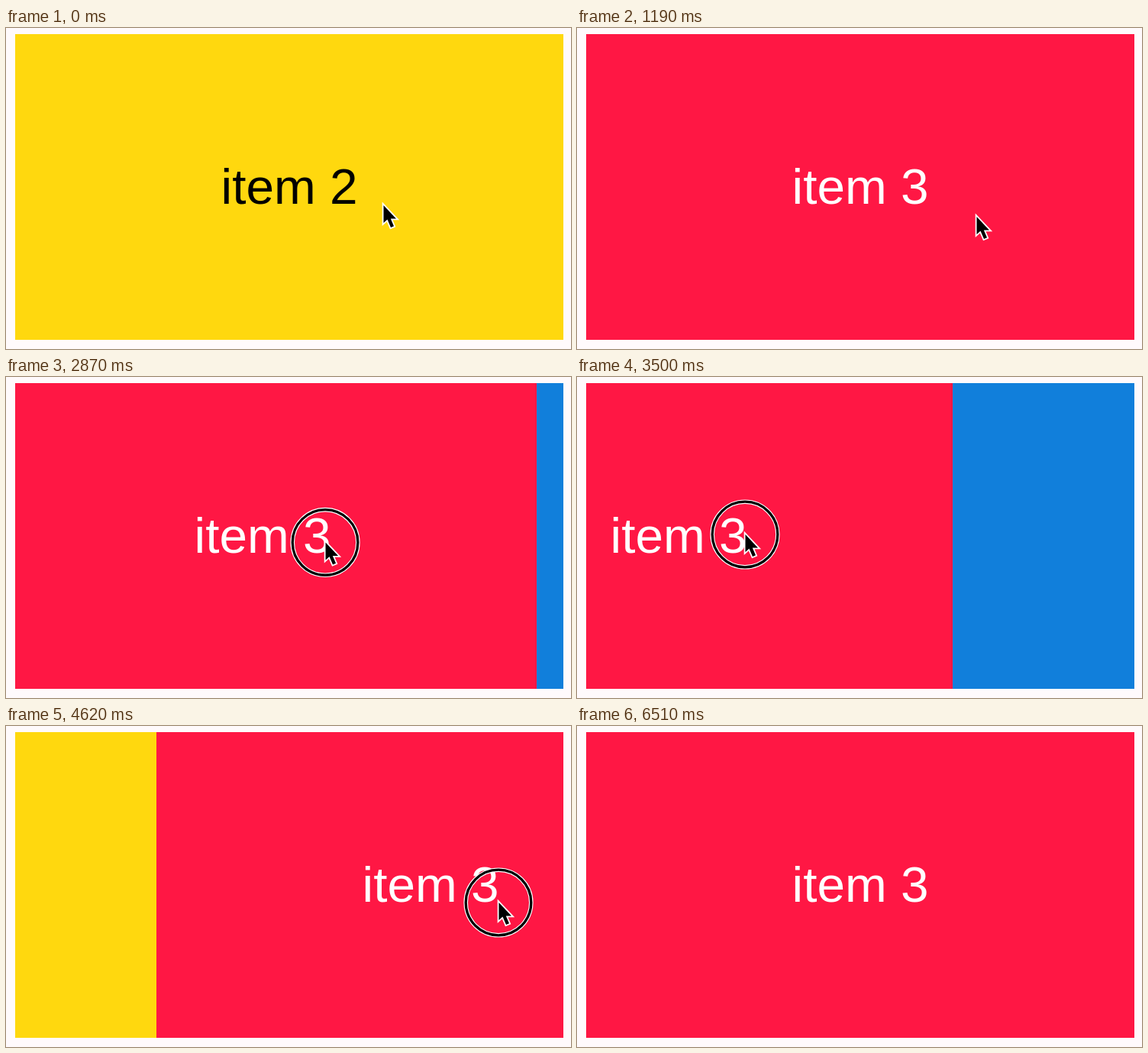
An HTML page that plays this animation: 740x420 px, repeating every 6.58 s.

```html
<!DOCTYPE html>
<html lang="en">
<head>
<meta charset="utf-8">
<title>Carousel</title>
<style>
  html, body { margin: 0; width: 100%; height: 100%; overflow: hidden; background: #fffafc; }
  svg { display: block; }
  text { font: 65.7px "Liberation Sans", Arial, sans-serif; text-anchor: middle; }
</style>
</head>
<body>
<svg width="740" height="420" viewBox="0 0 740 420">
  <clipPath id="frame"><rect x="12" y="8" width="718" height="400"/></clipPath>
  <g clip-path="url(#frame)"><g id="track"></g></g>
  <g id="pointer">
    <g id="ring" fill="none">
      <circle r="42.8" stroke="#fff" stroke-width="5.6"/>
      <circle r="42.8" stroke="#000" stroke-width="3.3"/>
    </g>
    <path id="arrow" d="M.5 0V23L5.5 18.5 10 29 14 27.3 9.8 17.5H17Z"
      stroke="#fff" stroke-width="3.6" paint-order="stroke"/>
    <g id="dot">
      <circle r="19" fill="#000" fill-opacity=".5"/>
      <circle r="21" fill="none" stroke="#fff" stroke-opacity=".35" stroke-width="4"/>
    </g>
  </g>
</svg>
<script>
const LOOP = 6580, STEP = 70, WIDTH = 718;
const SLIDE_AT = 219, RING_AT = 1750, DRAG_AT = 2690, RELEASE_AT = 4874;
const SNAP = 500, LAG = 23, GRAB_X = 460;

const slides = [
  ["item 2", "#ffd80e", "#000"],
  ["item 3", "#ff1744", "#fff"],
  ["item 4", "#117fdb", "#fff"]
];

// time, x, y of the pointer
const path = [
  [0, 494, 232], [140, 493.5, 231], [700, 493.5, 231], [1190, 523, 247],
  [1300, 523, 247], [1820, 310, 226], [1990, 310, 226], [2640, 461, 217],
  [2690, 460, 217], [3360, 256, 210], [3500, 220, 206], [4130, 582, 226],
  [4341, 645, 231], [5130, 645, 231], [5460, 725, 370], [5670, 765, 460]
];

const $ = id => document.getElementById(id);
const show = (id, on) => $(id).setAttribute("visibility", on ? "visible" : "hidden");
const move = (id, x, y) => $(id).setAttribute("transform", `translate(${x} ${y})`);

$("track").innerHTML = slides.map(([label, fill, ink], i) =>
  `<g transform="translate(${12 + i * WIDTH} 8)">
    <rect width="${WIDTH + 0.5}" height="400" fill="${fill}"/>
    <text x="359" y="222" fill="${ink}">${label}</text>
  </g>`).join("");

const slope = (i, axis) =>
  (path[i + 1][axis] - path[i][axis]) / (path[i + 1][0] - path[i][0]);

// Tangents are flat at turning points and at rests.
function tangent(i, axis) {
  if (i === 0 || i === path.length - 1) return 0;
  const a = slope(i - 1, axis), b = slope(i, axis);
  return a * b <= 0 ? 0 : (a + b) / 2;
}

function pointerAt(t, axis) {
  const last = path.length - 1;
  if (t >= path[last][0]) return path[last][axis];
  const i = path.findIndex(p => p[0] > t) - 1;
  const span = path[i + 1][0] - path[i][0];
  const u = (t - path[i][0]) / span, v = 1 - u;
  return path[i][axis] * v * v * (1 + 2 * u) + path[i + 1][axis] * u * u * (3 - 2 * u)
    + span * u * v * (tangent(i, axis) * v - tangent(i + 1, axis) * u);
}

// cubic-bezier(.25, .1, .25, 1)
function ease(x) {
  if (x <= 0) return 0;
  if (x >= 1) return 1;
  const bezier = (s, a, b) => 3 * s * (1 - s) ** 2 * a + 3 * s * s * (1 - s) * b + s ** 3;
  let lo = 0, hi = 1;
  for (let n = 0; n < 24; n++) {
    const mid = (lo + hi) / 2;
    if (bezier(mid, 0.25, 0.25) < x) lo = mid; else hi = mid;
  }
  return bezier(lo, 0.1, 1);
}

function dragAt(t) {
  if (t < DRAG_AT + LAG) return 0;
  const pulled = pointerAt(Math.min(t, RELEASE_AT) - LAG, 1) - GRAB_X;
  return pulled * (1 - ease((t - RELEASE_AT) / SNAP));
}

function draw(t) {
  const shift = -WIDTH * ease((t - SLIDE_AT) / SNAP) + dragAt(t);
  move("track", Math.round(shift), 0);
  move("pointer", pointerAt(t, 1), pointerAt(t, 2));
  const touch = t >= RELEASE_AT;
  show("ring", t >= RING_AT && !touch);
  show("arrow", !touch);
  show("dot", touch && t < 5670);
}

const start = performance.now();
function tick() {
  const t = (performance.now() - start) % LOOP;
  draw(Math.floor(t / STEP) * STEP);
  requestAnimationFrame(tick);
}
tick();
</script>
</body>
</html>
```
